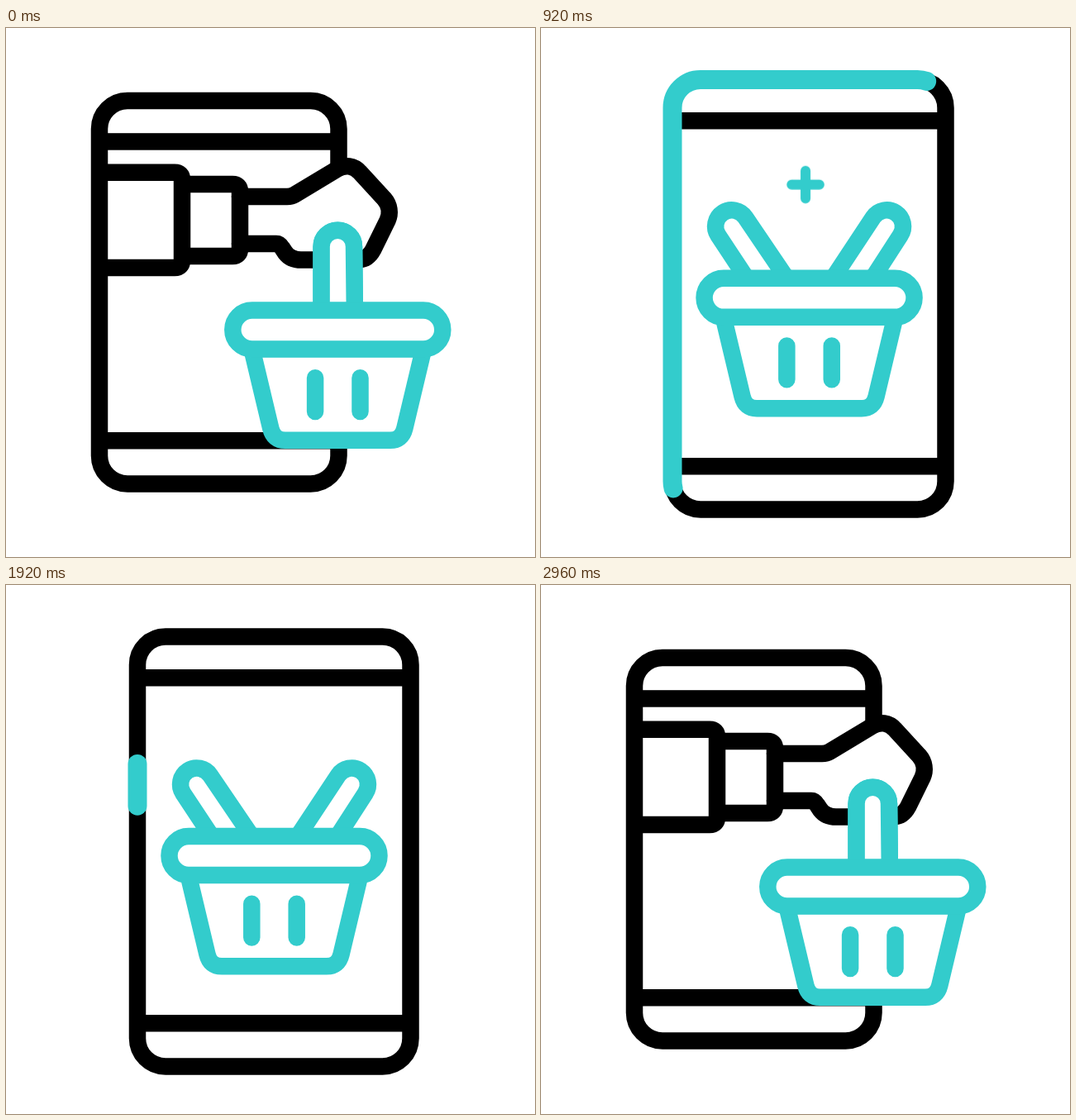
These frames come from a looping animation (640 by 640 pixels, 3000 ms). An HTML page without scripts:

```html
<!DOCTYPE html>
<html lang="en">
<head>
<meta charset="utf-8">
<title>Mobile shopping</title>
<style>
@property --p { syntax: "<number>"; inherits: true; initial-value: 0; }
@property --turn { syntax: "<number>"; inherits: true; initial-value: 0; }
@property --head { syntax: "<number>"; inherits: true; initial-value: 0; }
@property --tail { syntax: "<number>"; inherits: true; initial-value: 0; }
@property --open { syntax: "<number>"; inherits: true; initial-value: 0; }
@property --bx { syntax: "<length>"; inherits: true; initial-value: 401.3px; }
@property --by { syntax: "<length>"; inherits: true; initial-value: 255px; }
@property --tilt { syntax: "<angle>"; inherits: true; initial-value: 0deg; }

html, body { margin: 0; height: 100%; overflow: hidden; background: #fff; }

svg {
  display: block; width: 100%; height: 100%;
  fill: none; stroke: #000; stroke-width: 20.5;
  --ease: cubic-bezier(.3333, 0, .6667, 1);
  animation: 3s var(--ease) infinite;
  animation-name: phone, turn, head, tail, open, slide, lift, tilt;
}

/* phone: --p goes from small (0) to large (1) */
.case {
  x: calc((113 + 46 * var(--p)) * 1px);
  y: calc((88 - 25.5 * var(--p)) * 1px);
  width: calc((289.5 + 41 * var(--p)) * 1px);
  height: calc((463.5 + 56.5 * var(--p)) * 1px);
  rx: 34px;
}
.bar {
  x: calc((113 + 46 * var(--p)) * 1px);
  width: calc((289.5 + 41 * var(--p)) * 1px);
  height: 20.5px; fill: #000; stroke: none;
}
.top { y: calc((127.2 - 25.2 * var(--p)) * 1px); }
.bottom { y: calc((489 + 31 * var(--p)) * 1px); }
.screen { x: calc((122.8 + 46 * var(--p)) * 1px); }

.trace {
  stroke-width: 23; stroke-linecap: round;
  stroke-dasharray: calc((var(--head) - var(--tail)) * 1000px) calc((1 - var(--head) + var(--tail)) * 1000px);
  stroke-dashoffset: calc((.4845 + .41 * var(--turn) + var(--tail)) * -1000px);
  animation: trace 3s step-end infinite;
}

.teal { stroke: #3cc; }
.solid { fill: #fff; }
.round { stroke-linecap: round; }

.arm { animation: arm 3s var(--ease) infinite; }
.hand { transform-origin: 283px 222px; animation: hand 3s var(--ease) infinite; }
.plus { transform-origin: 320px 189.5px; animation: plus 3s var(--ease) infinite; }

/* the basket hangs from the top of its handle */
.basket { transform: translate(var(--bx), var(--by)) rotate(var(--tilt)); }
.handle {
  transform-origin: 0 77px;
  transform: translate(calc(var(--side) * 56.5px * var(--open)), calc(3px * var(--open)))
    rotate(calc(var(--side) * 33.5deg * var(--open)));
}

@keyframes phone {
  0%, 3.667% { --p: 0; }
  23.667%, 70.133% { --p: 1; }
  82.2%, 100% { --p: 0; }
}
@keyframes turn {
  0%, 9.4% { --turn: 0; }
  52.333%, 100% { --turn: 1; }
}
@keyframes head {
  0%, 10.4% { --head: 0; }
  52.133%, 100% { --head: 1; }
}
@keyframes tail {
  0%, 40.5% { --tail: 0; }
  66.8%, 100% { --tail: 1; }
}
@keyframes trace {
  0% { opacity: 0; }
  10.6% { opacity: 1; }
  66.7%, 100% { opacity: 0; }
}
@keyframes open {
  0%, 14.667% { --open: 0; }
  25.267%, 68.667% { --open: 1; }
  78.133%, 100% { --open: 0; }
}
@keyframes slide {
  0%, 3.667% { --bx: 401.3px; }
  21.133% { --bx: 326px; }
  32% { --bx: 324.5px; }
  67.667% { --bx: 324.5px; animation-timing-function: cubic-bezier(.2, .52, .6, 1); }
  81.333%, 100% { --bx: 401.3px; }
}
@keyframes lift {
  0%, 3.667% { --by: 255px; }
  21.133% { --by: 188.3px; }
  32%, 68% { --by: 217.5px; }
  75.933%, 100% { --by: 255px; }
}
@keyframes tilt {
  0%, 68% { --tilt: 0deg; }
  75.933%, 80% { --tilt: -19.5deg; }
  98.667%, 100% { --tilt: 0deg; }
}
@keyframes arm {
  0%, 7.5% { transform: translate(0, 0); }
  21.333% { transform: translate(-330px, -39px); }
  64.667% { transform: translate(-330px, -25px); }
  77.5%, 100% { transform: translate(0, 0); }
}
@keyframes hand {
  0%, 3.667% { transform: rotate(0deg); }
  10%, 75% { transform: rotate(4.6deg); }
  84%, 100% { transform: rotate(0deg); }
}
@keyframes plus {
  0%, 24% { transform: scale(0); }
  36%, 50% { transform: scale(1); }
  62%, 100% { transform: scale(0); }
}
</style>
</head>
<body>
<svg viewBox="0 0 640 640">
  <defs>
    <clipPath id="screen"><rect class="screen" y="0" width="640" height="640"/></clipPath>
    <path id="handle" d="M-19.7 108V9.5A19.7 19.7 0 0 1 19.7 9.5L20.8 108"/>
  </defs>

  <rect class="bar top"/>
  <rect class="bar bottom"/>
  <rect class="case"/>
  <rect class="case trace teal" pathLength="1000"/>

  <g clip-path="url(#screen)">
    <g class="arm">
      <path class="hand solid round" d="M283 204H340Q345.500 204 349.500 201.500L401 170.500C410 165 421 166.500 428 174.500L457.500 206.500C464 214 465.500 224 461.500 233L444 268.500C440 276 434 280 427 280.500H357C347 280.500 341 276 338 272L334 266Q331 261 327 261H283"/>
      <path d="M213 189H274Q283 189 283 198V267Q283 276 274 276H213"/>
      <path d="M-200 174.700H204Q213 174.700 213 183.700V281Q213 290 204 290H-200"/>
    </g>
  </g>

  <path class="plus teal round" d="M291.400 189.500H348.600M320 161V218"/>

  <g class="basket teal">
    <use href="#handle" class="handle solid" style="--side:1"/>
    <use href="#handle" class="handle solid" style="--side:-1"/>
    <path class="solid" d="M-104 133L-81 229.500Q-77.500 243.800 -63.500 243.800H63.500Q77.500 243.800 81 229.500L104 133Z"/>
    <rect class="solid" x="-127" y="86.500" width="254" height="47" rx="23.500"/>
    <path class="round" d="M-27.200 168.200V209M27.200 168.200V209"/>
  </g>
</svg>
</body>
</html>
```
